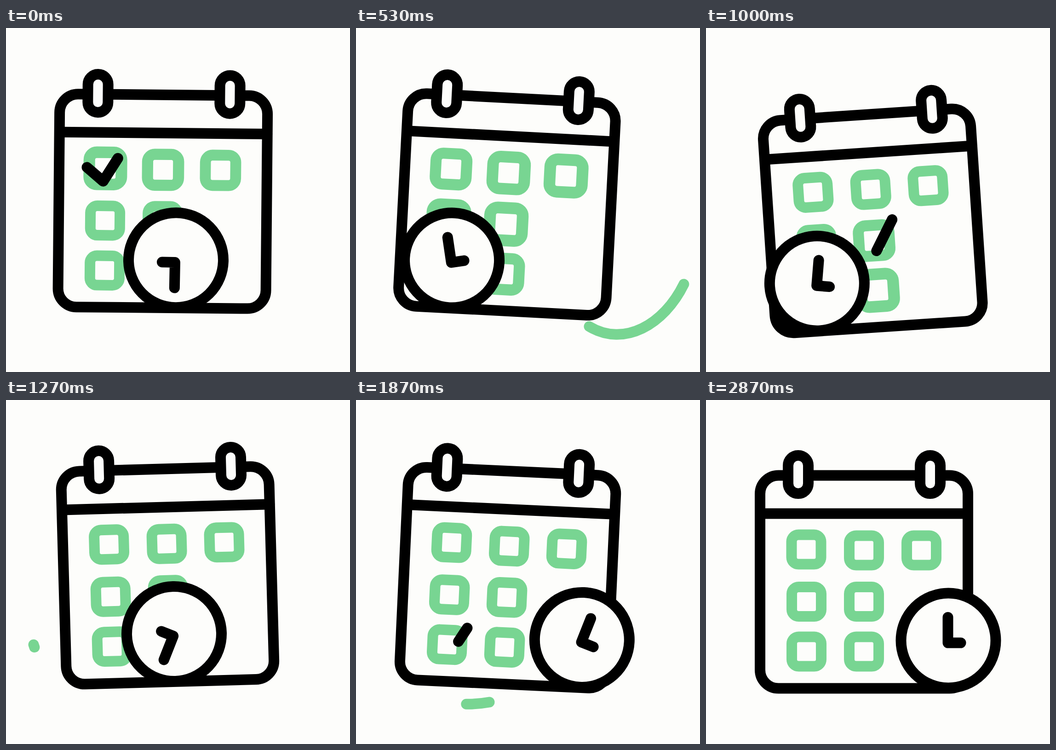
An HTML page for the animation above (2940 ms loop, 748 by 748 pixels).

```html
<!DOCTYPE html>
<html lang="en">
<head>
<meta charset="utf-8">
<title>Calendar and clock</title>
<style>
  /* --t: loop time in ms; --p: clock travel, 0 = right, 1 = left */
  @property --t { syntax: "<number>"; inherits: true; initial-value: 0; }
  @property --p { syntax: "<number>"; inherits: true; initial-value: 0; }

  html, body { margin: 0; width: 100%; height: 100%; overflow: hidden; background: #fdfdfb; }
  svg {
    display: block; width: 100%; height: 100%;
    fill: none; stroke: #000; stroke-width: 23;
    stroke-linecap: round; stroke-linejoin: round;
    animation: time 2940ms linear infinite;
  }
  .paper { fill: #fdfdfb; }
  .green { stroke: #78d592; }

  .calendar {
    transform-origin: 344px 105px;
    animation: hop 2940ms linear infinite;
  }
  .clock {
    translate: calc(var(--p) * -315px) 0px;
    animation: travel 2940ms linear infinite;
  }
  .hands {
    transform-origin: 525.5px 528px;
    rotate: calc(var(--p) * 370deg);
  }
  .day {
    transform-box: fill-box; transform-origin: center;
    scale: calc(1 + .12 * sin(3.14159 * clamp(0, (var(--t) - var(--s)) / 900, 1)));
  }

  /* Stroke drawn from time --in, then wiped from its start at --out */
  .draw {
    --b: clamp(0, (var(--t) - var(--in)) / var(--in-d), 1);
    --a: clamp(0, (var(--t) - var(--out)) / var(--out-d), 1);
    stroke-dasharray: calc(100px * (var(--b) - var(--a))) 300px;
    stroke-dashoffset: calc(-100px * var(--a));
    opacity: calc(1000 * (var(--b) - var(--a)));
  }
  .spark { --in: 2060; --in-d: 130; --out: 2280; --out-d: 170; }

  @keyframes time { from { --t: 0; } to { --t: 2940; } }

  @keyframes hop {
    0% { translate: 0 -18.5px; rotate: .5deg; animation-timing-function: ease-out; }
    9.2% { translate: 0 -36px; rotate: 3.8deg; animation-timing-function: ease-in; }
    18.03% { translate: 0 -11.5px; rotate: 3deg; }
    21.8% { translate: 0 0; rotate: 1.6deg; animation-timing-function: ease-out; }
    26.5%, 28.9% { translate: 0 0; rotate: 0deg; animation-timing-function: ease-in-out; }
    34.01% { translate: 0 24.5px; rotate: -3.8deg; }
    36.7% { translate: 0 22px; rotate: -3.8deg; animation-timing-function: cubic-bezier(.4, 0, .8, .8); }
    43.2% { translate: 0 -14px; rotate: -1.6deg; animation-timing-function: ease-out; }
    53.1% { translate: 0 -36px; rotate: 3.7deg; }
    54.42% { translate: 0 -34.5px; rotate: 3.8deg; animation-timing-function: ease-in; }
    62.9% { translate: 0 -11px; rotate: 2.9deg; }
    66.7% { translate: 0 0; rotate: 1.6deg; animation-timing-function: ease-out; }
    71.4%, 91.2% { translate: 0 0; rotate: 0deg; animation-timing-function: ease-in-out; }
    95.24%, 97.5% { translate: 0 22px; rotate: -3.3deg; }
    97.51%, 100% { translate: 0 0; rotate: 0deg; }
  }

  @keyframes travel {
    0% { --p: .487; }
    9.9% { --p: .787; }
    18.03% { --p: .942; animation-timing-function: ease-out; }
    30.3% { --p: .99; }
    34.01% { --p: .996; }
    35% { --p: .99; }
    37.4% { --p: .88; }
    43.2% { --p: .55; }
    54.42% { --p: .213; }
    62.6% { --p: .058; animation-timing-function: ease-out; }
    74.83% { --p: .01; }
    81.6%, 100% { --p: 0; }
  }
</style>
</head>
<body>
<svg viewBox="0 0 748 748">
  <path class="green draw" pathLength="100" style="--in:30;--in-d:300;--out:500;--out-d:260"
        d="M726 525C690 632 592 700 507 649"/>
  <path class="green draw" pathLength="100" style="--in:1265;--in-d:300;--out:1640;--out-d:280"
        d="M60 532C92 630 184 676 290 657"/>

  <g class="green">
    <path class="draw spark" pathLength="100" d="M288 123L268 96"/>
    <path class="draw spark" pathLength="100" d="M341 98V80"/>
    <path class="draw spark" pathLength="100" d="M395 128L415 105"/>
  </g>

  <g class="calendar">
    <rect class="paper" x="117.5" y="164" width="452" height="463" rx="40"/>
    <path d="M118 247H569"/>
    <rect class="paper" x="178.5" y="120.5" width="44" height="83" rx="22"/>
    <rect class="paper" x="465.5" y="120.5" width="44" height="83" rx="22"/>

    <g class="green">
      <rect class="day" style="--s:-250" x="186" y="293" width="64" height="64" rx="15"/>
      <rect class="day" style="--s:-130" x="311.5" y="295" width="64" height="64" rx="15"/>
      <rect class="day" style="--s:-70" x="436.5" y="295" width="64" height="64" rx="15"/>
      <rect class="day" style="--s:60" x="186.5" y="406.5" width="64" height="64" rx="15"/>
      <rect class="day" style="--s:200" x="311.5" y="406.5" width="64" height="64" rx="15"/>
      <rect class="day" style="--s:290" x="186.5" y="515" width="64" height="64" rx="15"/>
      <rect class="day" style="--s:380" x="311.5" y="515" width="64" height="64" rx="15"/>
    </g>

    <path class="draw" pathLength="100" style="--in:-135;--in-d:160;--out:230;--out-d:150"
          transform="translate(218 325)" d="M-40-2L-4.5 28L37-38"/>
    <path class="draw" pathLength="100" style="--in:600;--in-d:180;--out:934;--out-d:150"
          transform="translate(343.5 438.5)" d="M-37-10L0 29L42-43"/>
    <path class="draw" pathLength="100" style="--in:1380;--in-d:180;--out:1760;--out-d:150"
          transform="translate(218 547)" d="M-37-10L2 30L42.5-38"/>

    <g class="clock">
      <circle class="paper" cx="527" cy="523" r="103"/>
      <path class="hands" d="M526 472.5V528H554"/>
    </g>
  </g>
</svg>
</body>
</html>
```
